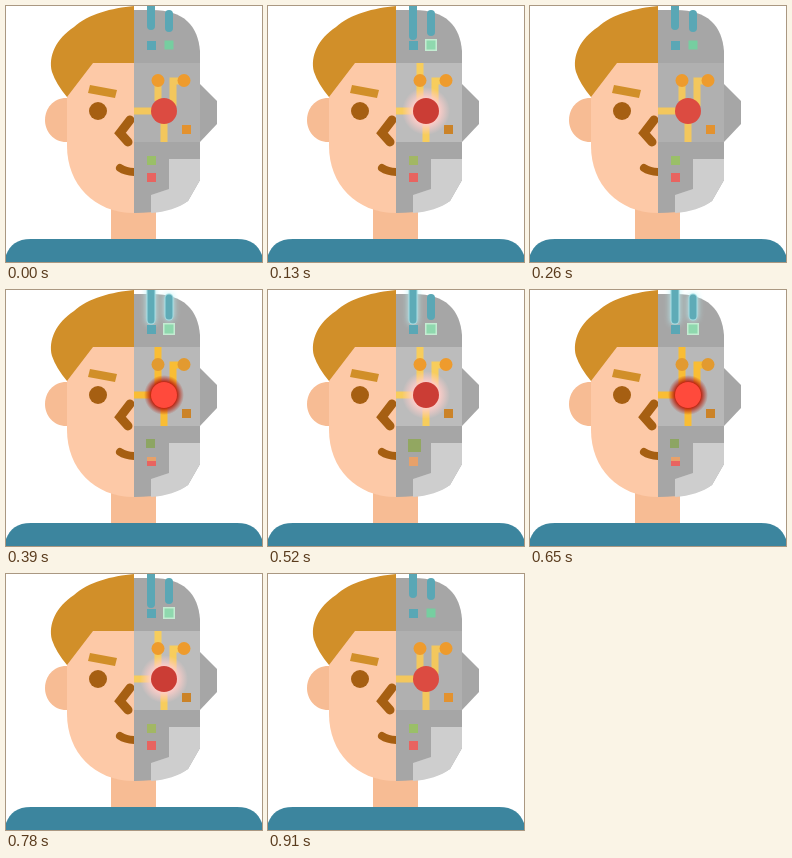
Recreate the animation shown at these times as an HTML page with a canvas. Size 256x256 px, loop 1040 ms.

```html
<!DOCTYPE html>
<html lang="en">
<head>
<meta charset="utf-8">
<title>Half human, half robot</title>
<style>
html, body { margin: 0; height: 100%; overflow: hidden; background: #fff; }
canvas { display: block; width: 100vw; height: 100vh; }
</style>
</head>
<body>
<canvas id="stage" width="256" height="256"></canvas>
<script>
const ctx = document.getElementById('stage').getContext('2d');
const STEP = 130;

const rest = {
  plate: '#b0b0b0', wire: '#f3c75d', wireTop: 75, dot: '#ee9b2d', chip: '#e3922f',
  core: '#dc4b41', left: 20, right: 22, mint: '#76cea0',
  green: [141, 150, 9, '#9abf68'], low: [141, 167, 9, '#e86460']
};
const glow = {
  ...rest, plate: '#bcbcbc', wire: '#f7cd5c', wireTop: 57, chip: '#cb8328',
  core: '#cb3d35', halo: '255,205,200', haloSize: 24,
  left: 30, right: 26, mint: '#8fd8ae', mintLit: true,
  green: [141, 150, 9, '#a2b764']
};
const charged = {
  ...glow, leftLit: true,
  green: [140, 149, 13, '#92a761'], low: [141, 167, 9, '#e7a16a']
};
const surge = {
  ...glow, plate: '#b8b8b8', wire: '#f9bd34', dot: '#e29a30',
  core: '#ff4a3c', halo: '185,30,10', haloSize: 20, leftLit: true, rightLit: true,
  green: [140, 149, 9, '#8da563'], stripe: true
};
const sequence = [rest, glow, rest, surge, charged, surge, glow, rest];

function shape(d, color) {
  ctx.fillStyle = color;
  ctx.fill(new Path2D(d));
}
function stroke(d, color, width, cap = 'round') {
  ctx.strokeStyle = color;
  ctx.lineWidth = width;
  ctx.lineCap = cap;
  ctx.lineJoin = 'miter';
  ctx.stroke(new Path2D(d));
}
function disc(x, y, r, color) {
  ctx.fillStyle = color;
  ctx.beginPath();
  ctx.arc(x, y, r, 0, Math.PI * 2);
  ctx.fill();
}
function square(x, y, size, color) {
  ctx.fillStyle = color;
  ctx.fillRect(x, y, size, size);
}

function drawHuman() {
  shape('M105 185H150V234H105Z', '#f7bc94');
  shape('M0 256V249C4 239 11 233 25 233H231C245 233 252 239 256 249V256Z', '#3c859e');
  shape('M62 92C48 91 39 102 39 114S48 137 62 136Z', '#f7bc94');
  shape('M61 50H128V207C88 207 61 178 61 140Z', '#fdc9a7');
  shape('M128 0C106 2 82 8 68 21C50 33 42 50 46 66Q50 78 61 91L87 57H128Z', '#d18f29');
  shape('M84 79L111 84L109 92L82 87Z', '#d18f29');
  disc(92, 105, 9, '#a65f12');
  ctx.save();
  ctx.beginPath();
  ctx.rect(0, 0, 128, 256);
  ctx.clip();
  stroke('M124 114L114 127L122 136', '#a65f12', 9);
  stroke('M114 162Q120 166 130 166', '#a65f12', 8);
  ctx.restore();
}

function antenna(x, top, bottom, lit) {
  const line = `M${x} ${top}V${bottom}`;
  if (lit) {
    ctx.save();
    ctx.shadowColor = '#b8f0f5';
    ctx.shadowBlur = 6;
    stroke(line, '#a4dce2', 9);
    ctx.restore();
  }
  stroke(line, lit ? '#5eabb7' : '#5aa7b5', lit ? 7 : 8);
}

function drawRobot(s) {
  shape('M194 78L211 95V118L194 136Z', '#a6a6a6');
  shape('M128 4H146C178 4 192 20 194 45V174L182 195C170 203 150 207 128 207Z', '#a6a6a6');
  shape('M128 57H194V136H128Z', s.plate);
  shape('M163 153H194V174L182 195C173 202 160 206 145 207V189L163 183Z', '#cecece');

  stroke(`M128 105H158M152 ${s.wireTop}V95M178 75H167V100M158 105V136`, s.wire, 7, 'butt');
  disc(152, 74.5, 6.5, s.dot);
  disc(178, 74.5, 6.5, s.dot);
  square(176, 119, 9, s.chip);

  if (s.halo) {
    const light = ctx.createRadialGradient(158, 105, 13, 158, 105, s.haloSize);
    light.addColorStop(0, `rgba(${s.halo},.95)`);
    light.addColorStop(1, `rgba(${s.halo},0)`);
    disc(158, 105, s.haloSize, light);
  }
  disc(158, 105, 13, s.core);

  antenna(145, 0, s.left, s.leftLit);
  antenna(163, 8, s.right, s.rightLit);
  square(141, 35, 9, '#5aa7b5');
  if (s.mintLit) square(157, 33, 12, '#c4ecd2');
  square(158.5, 34.5, 9, s.mint);
  square(...s.green);
  square(...s.low);
  if (s.stripe) {
    ctx.fillStyle = '#e7a16a';
    ctx.fillRect(141, 167, 9, 4);
  }
}

function frame() {
  const step = Math.floor(performance.now() / STEP) % sequence.length;
  ctx.clearRect(0, 0, 256, 256);
  drawHuman();
  drawRobot(sequence[step]);
  requestAnimationFrame(frame);
}
frame();
</script>
</body>
</html>
```
